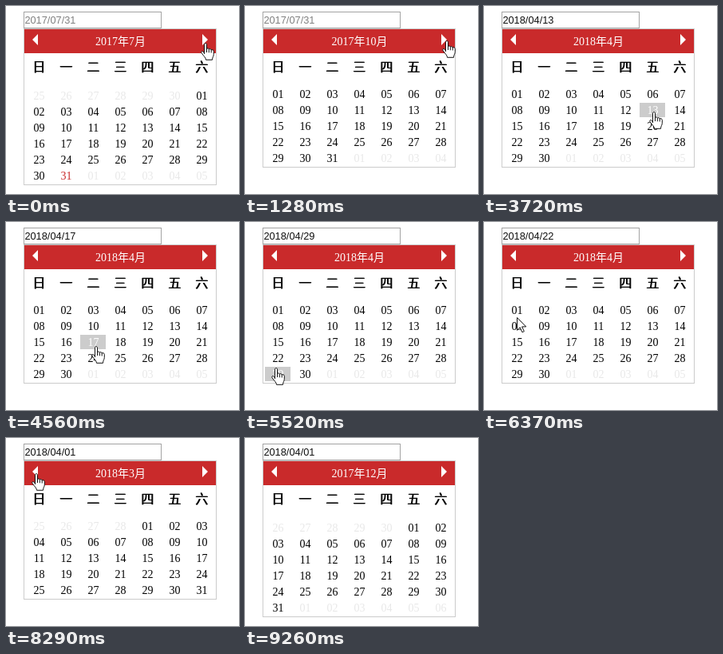
These frames come from a looping animation (292x235 px, 9.53 s). An HTML page:

```html
<!DOCTYPE html>
<html lang="zh">
<head>
<meta charset="utf-8">
<title>Date picker</title>
<style>
  html, body { margin: 0; width: 100%; height: 100%; overflow: hidden; background: #fff; }
  svg { display: block; width: 292px; height: 235px; }
  text { font: 14px "Liberation Serif", "Noto Sans CJK SC", serif; text-anchor: middle; }
  #value { font: 12.8px "Liberation Sans", sans-serif; text-anchor: start; }
  #title { fill: #fff; font-weight: 300; }
  .week { font: 400 16px "Noto Sans CJK SC", sans-serif; text-shadow: .7px 0 #000; }
  .cursor { fill: #fff; stroke: #111; stroke-linejoin: round; }
</style>
</head>
<body>
<svg viewBox="0 0 292 235">
  <rect x="22.5" y="7.5" width="172" height="20" fill="#fff" stroke="#a3a3a3"/>
  <text id="value" x="23.4" y="22"></text>
  <rect id="panel" x="22.5" y="28.5" width="241" fill="#fff" stroke="#ccc"/>
  <rect x="23" y="29" width="240" height="30" fill="#c92a2b"/>
  <path d="M33 42L40 35V49ZM253 42L246 35V49Z" fill="#fff"/>
  <text id="title" x="143.5" y="49"></text>
  <rect id="hover" width="32" height="18" fill="#ccc"/>
  <g id="grid"></g>
  <g id="hand" class="cursor">
    <path d="M4.5 14V2.2C4.5 .1 7.5 .1 7.5 2.2V8C7.5 6.6 10.2 6.6 10.3 8.3C10.8 7.2 13 7.4 13.2 9C14 8.3 16.3 8.7 16.3 10.5V14.5C16.3 17 14.5 18 14.5 21.3H6.5C6.5 18.5 3.5 16.5 1 12.6C0 10.9 2 9.8 3.2 11.2L4.5 13"/>
    <path d="M7.5 8v4M10.3 8.3v4M13.2 9v3.5" fill="none"/>
  </g>
  <path id="arrow" class="cursor" d="M.5 .5V16.3L4.2 12.8 6.9 18.8 9.3 17.7 6.6 11.9H11.7Z"/>
</svg>
<script>
const LOOP = 9530, STEP = 137, LEAVE = 9260;
const NEXT = [420, 820, 1280, 1580, 1730, 2030, 2160, 2300, 2610];
const PREV = [8290, ...[0, 1, 2].map(i => 8720 + 140 * i)];
const HOME = { x: 250, y: 46 };
// pointer moves; a move with a day ends in a click on it
const MOVES = [
  { from: 0, to: 420, x: 253, y: 43 },
  { from: 2610, to: 3290, x: 216, y: 112, day: '06' },
  { from: 3290, to: 3720, x: 213, y: 132, day: '13' },
  { from: 3870, to: 4550, x: 113, y: 155, day: '17' },
  { from: 4690, to: 5390, x: 39, y: 182, day: '29' },
  { from: 5670, to: 5820, x: 40, y: 166, day: '22' },
  { from: 5820, to: 6090, x: 41, y: 119 },
  { from: 6230, to: 6940, x: 43, y: 49 },
  { from: 6940, to: 7240, x: 44, y: 98 },
  { from: 7240, to: 7640, x: 44, y: 108, day: '01' },
  { from: 7640, to: 8160, x: 38, y: 44 },
  { from: 9000, to: 9130, x: 95, y: 216 }
];

const $ = id => document.getElementById(id);
const colX = c => 25 + 34 * c;
const pad = n => String(n).padStart(2, '0');

function addText(x, y, str = '') {
  const el = document.createElementNS('http://www.w3.org/2000/svg', 'text');
  el.setAttribute('x', x);
  el.setAttribute('y', y);
  el.textContent = str;
  $('grid').append(el);
  return el;
}

[...'日一二三四五六'].forEach((d, c) => addText(colX(c) + 16, 82, d).classList.add('week'));
const cells = Array.from({ length: 42 }, (_, i) => addText(colX(i % 7) + 16.5, 0));

// The pointer was sampled in even steps, so each move advances in jumps.
function pointer(t) {
  let { x, y } = HOME;
  for (const m of MOVES) {
    if (t < m.from) break;
    const n = Math.round((m.to - m.from) / STEP);
    const k = Math.min(1, Math.floor((t - m.from) / (m.to - m.from) * n) / n);
    x += (m.x - x) * k;
    y += (m.y - y) * k;
  }
  return [Math.round(x), Math.round(y)];
}

function cellAt(x, y, rows, top) {
  const c = Math.floor((x - 25) / 34), r = Math.floor((y - top) / 20);
  const inside = c >= 0 && c < 7 && r >= 0 && r < rows &&
    x - colX(c) < 32 && y - top - 20 * r < 18;
  return inside ? r * 7 + c : -1;
}

function show(el, on, x, y) {
  el.setAttribute('visibility', on ? 'visible' : 'hidden');
  if (on) el.setAttribute('transform', `translate(${x} ${y})`);
}

function render(t) {
  const passed = list => list.filter(s => t >= s).length;
  const month = 6 + passed(NEXT) - passed(PREV);
  const first = new Date(2017, month, 1);
  const lead = first.getDay();
  const rows = Math.ceil((lead + new Date(2017, month + 1, 0).getDate()) / 7);
  const top = rows === 6 ? 103 : 101;
  const [x, y] = pointer(t);
  const visible = t < LEAVE;
  const hot = visible ? cellAt(x, y, rows, top) : -1;

  const pick = MOVES.filter(m => m.day && t >= m.to).pop();
  $('value').textContent = pick ? '2018/04/' + pick.day : '2017/07/31';
  $('value').setAttribute('fill', pick ? '#111' : '#808080');
  $('title').textContent = `${first.getFullYear()}年${first.getMonth() + 1}月`;
  $('panel').setAttribute('height', top - 28 + 20 * rows);

  cells.forEach((el, i) => {
    const date = new Date(2017, month, 1 - lead + i);
    const own = date.getMonth() === first.getMonth();
    const today = month === 6 && own && date.getDate() === 31;
    el.textContent = i < rows * 7 ? pad(date.getDate()) : '';
    el.setAttribute('y', top + 14 + 20 * Math.floor(i / 7));
    el.setAttribute('fill', i === hot ? '#fff' : today ? '#c92a2b' : own ? '#000' : '#e8e8e8');
  });

  show($('hover'), hot >= 0, colX(hot % 7), top + 20 * Math.floor(hot / 7));
  const onButton = y > 33 && y < 49 && (x > 240 || x < 50);
  const hand = hot >= 0 || onButton;
  show($('hand'), visible && hand, x - 6, y);
  show($('arrow'), visible && !hand, x, y);
}

const start = performance.now();
function tick() {
  render((performance.now() - start) % LOOP);
  requestAnimationFrame(tick);
}
tick();
</script>
</body>
</html>
```
